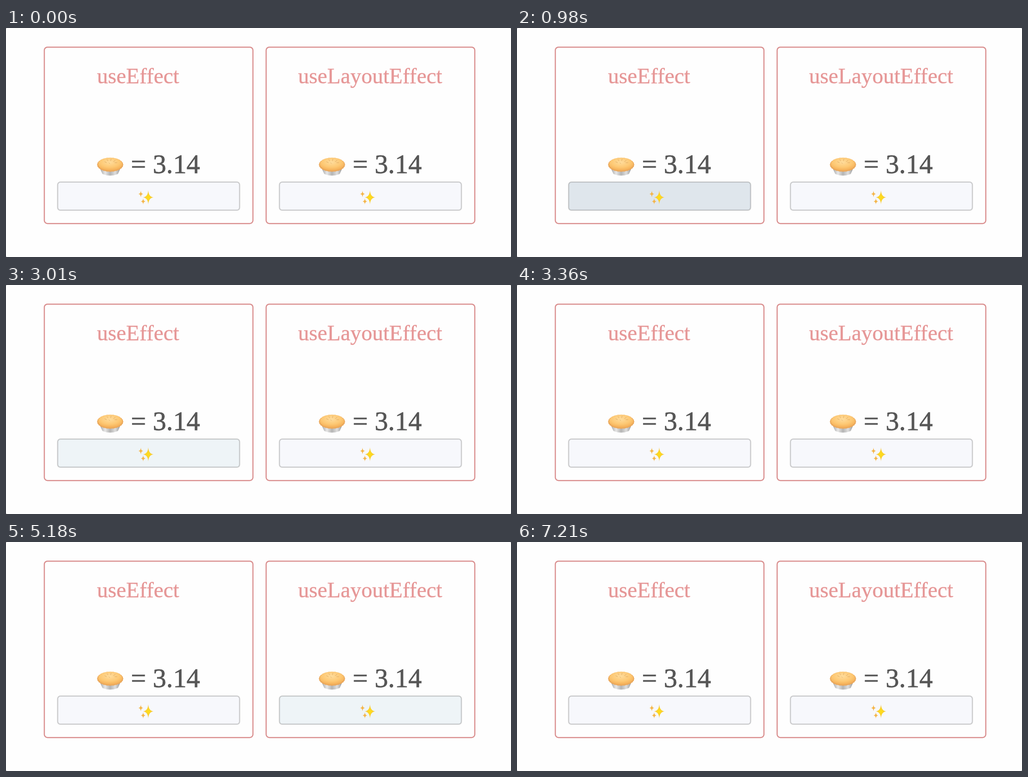
Recreate the animation shown at these times as an HTML page. Size 1110 by 505 pixels, loop 7.28 s.

```html
<!DOCTYPE html>
<html lang="en">
<head>
<meta charset="utf-8">
<title>useEffect and useLayoutEffect</title>
<style>
  html, body { margin: 0; width: 100%; height: 100%; overflow: hidden; background: #777; }
  svg { display: block; width: 1110px; height: 505px; background: #fefefe; border-radius: 2px; }
  text { font-family: "Liberation Serif", "Times New Roman", serif; font-variant-ligatures: none; }
  .title { font-size: 48.1px; fill: #e69797; stroke: #e69797; stroke-width: .4; }
  .value { font-size: 59.2px; fill: #565656; stroke: #565656; stroke-width: .8; }
  .card { fill: none; stroke: #da9090; stroke-width: 2.5; }
  .button { fill: #f7f8fc; stroke: rgba(0, 0, 0, .19); stroke-width: 2.5; }
</style>
</head>
<body>
<svg viewBox="0 0 1110 505">
  <defs>
    <linearGradient id="tin">
      <stop offset="0" stop-color="#a8a8a8"/>
      <stop offset=".25" stop-color="#e6e6e6"/>
      <stop offset=".5" stop-color="#b4b4b4"/>
      <stop offset=".75" stop-color="#dedede"/>
      <stop offset="1" stop-color="#999"/>
    </linearGradient>
    <radialGradient id="crust" cx=".48" cy=".35" r=".62">
      <stop offset="0" stop-color="#ffdc9c"/>
      <stop offset=".65" stop-color="#fdc873"/>
      <stop offset="1" stop-color="#f6b25a"/>
    </radialGradient>
    <radialGradient id="gold">
      <stop offset="0" stop-color="#ffe014"/>
      <stop offset="1" stop-color="#f3c04a"/>
    </radialGradient>
    <path id="star" d="M0-1Q.08-.08 1 0Q.08.08 0 1Q-.08.08-1 0Q-.08-.08 0-1Z"/>

    <g id="pie">
      <path d="M-22 8L-17 19Q0 26 17 19L22 8Z" fill="url(#tin)"/>
      <path id="rim" fill="#eba95c"/>
      <ellipse cy="-3" rx="26.5" ry="14" fill="url(#crust)"/>
      <path d="M-12-8l4 2M-7-13l2 3M2-14l-1 4M11-11l-4 3M15-6l-5 0M-3-6l2 2"
            fill="none" stroke="#c08a48" stroke-width=".8" stroke-linecap="round" opacity=".7"/>
    </g>

    <g id="sparkles">
      <use href="#star" transform="translate(312.7 373.5) scale(11.5 15.5)" fill="url(#gold)"/>
      <use href="#star" transform="translate(296.3 366) scale(5.3 7.3)" fill="#f4b64c"/>
      <use href="#star" transform="translate(301.5 382.5) scale(5 7)" fill="#f4b64c"/>
    </g>

    <g id="stopwatch" stroke-linecap="round">
      <path d="M0-18v5M11-10l3-3" stroke="#88898c" stroke-width="3"/>
      <path d="M-2.5-18.5h5M12.5-14.5l3 3" stroke="#66676a" stroke-width="3"/>
      <circle r="13.8" fill="#f5f5f5" stroke="#66676a" stroke-width="2.4"/>
      <circle r="10" fill="none" stroke="#777" stroke-width="2"
              stroke-dasharray=".7 4.536" stroke-linecap="butt"/>
      <path d="M0 0L-5-4M0 0L7-5" stroke="#444" stroke-width="1.3"/>
      <path d="M0 3V-8" stroke="#d98a84" stroke-width=".7"/>
      <circle r="1.3" fill="#555"/>
    </g>

    <g id="result">
      <use href="#pie" x="229" y="303"/>
      <text class="value" x="274.6" y="319.5">= 3.14</text>
    </g>
  </defs>

  <rect class="card" x="84.2" y="42.2" width="458.6" height="389" rx="7"/>
  <text class="title" id="leftTitle" x="200" y="121.5">useEffect</text>
  <use href="#result" id="ready"/>
  <g id="pending" opacity="0">
    <use href="#pie" x="266" y="303"/>
    <text class="value" x="311.6" y="319.5">= 0</text>
  </g>
  <rect class="button" id="leftButton" x="113.5" y="339.8" width="400" height="62" rx="6"/>
  <use href="#sparkles" id="leftSparkles"/>
  <use href="#stopwatch" id="timer" x="308" y="376" opacity="0"/>

  <rect class="card" x="571.8" y="42.2" width="458.6" height="389" rx="7"/>
  <text class="title" x="642" y="121.5">useLayoutEffect</text>
  <use href="#result" x="487.5"/>
  <rect class="button" id="rightButton" x="601" y="339.8" width="400" height="62" rx="6"/>
  <use href="#sparkles" x="487.3"/>
</svg>
<script>
  const LOOP = 7280;
  const IDLE = '#f7f8fc', HOVER = '#eef4f7', PRESSED = '#dfe6ec';
  const PENDING_FROM = 1330, PENDING_TO = 2590;
  const get = id => document.getElementById(id);

  // Scalloped edge of the pie crust.
  const rim = Array.from({ length: 145 }, (_, i) => {
    const a = i / 144 * 2 * Math.PI, r = 1 + .015 * Math.cos(24 * a);
    return `${(28.6 * r * Math.cos(a)).toFixed(2)} ${(-1.5 + 15.4 * r * Math.sin(a)).toFixed(2)}`;
  });
  get('rim').setAttribute('d', `M${rim.join('L')}Z`);

  // Each change is [start, duration, value]; zero duration is a hard cut.
  function track(id, prop, initial, changes) {
    let value = initial;
    const frames = [{ offset: 0, [prop]: value }];
    for (const [start, duration, next] of changes) {
      frames.push({ offset: start / LOOP, [prop]: value },
                  { offset: (start + duration) / LOOP, [prop]: next });
      value = next;
    }
    frames.push({ offset: 1, [prop]: value });
    get(id).animate(frames, { duration: LOOP, iterations: Infinity });
  }

  const whilePending = (id, prop, normal, pending) =>
    track(id, prop, normal, [[PENDING_FROM, 0, pending], [PENDING_TO, 0, normal]]);

  whilePending('leftTitle', 'transform', 'translate(0px)', 'translate(23px)');
  whilePending('ready', 'opacity', 1, 0);
  whilePending('leftSparkles', 'opacity', 1, 0);
  whilePending('pending', 'opacity', 0, 1);
  whilePending('timer', 'opacity', 0, 1);

  track('leftButton', 'fill', IDLE, [
    [490, 100, HOVER], [860, 80, PRESSED], [PENDING_FROM, 80, HOVER], [3170, 100, IDLE]
  ]);
  track('rightButton', 'fill', IDLE, [
    [3710, 100, HOVER], [4130, 80, PRESSED], [5060, 80, HOVER], [6230, 100, IDLE]
  ]);
</script>
</body>
</html>
```
